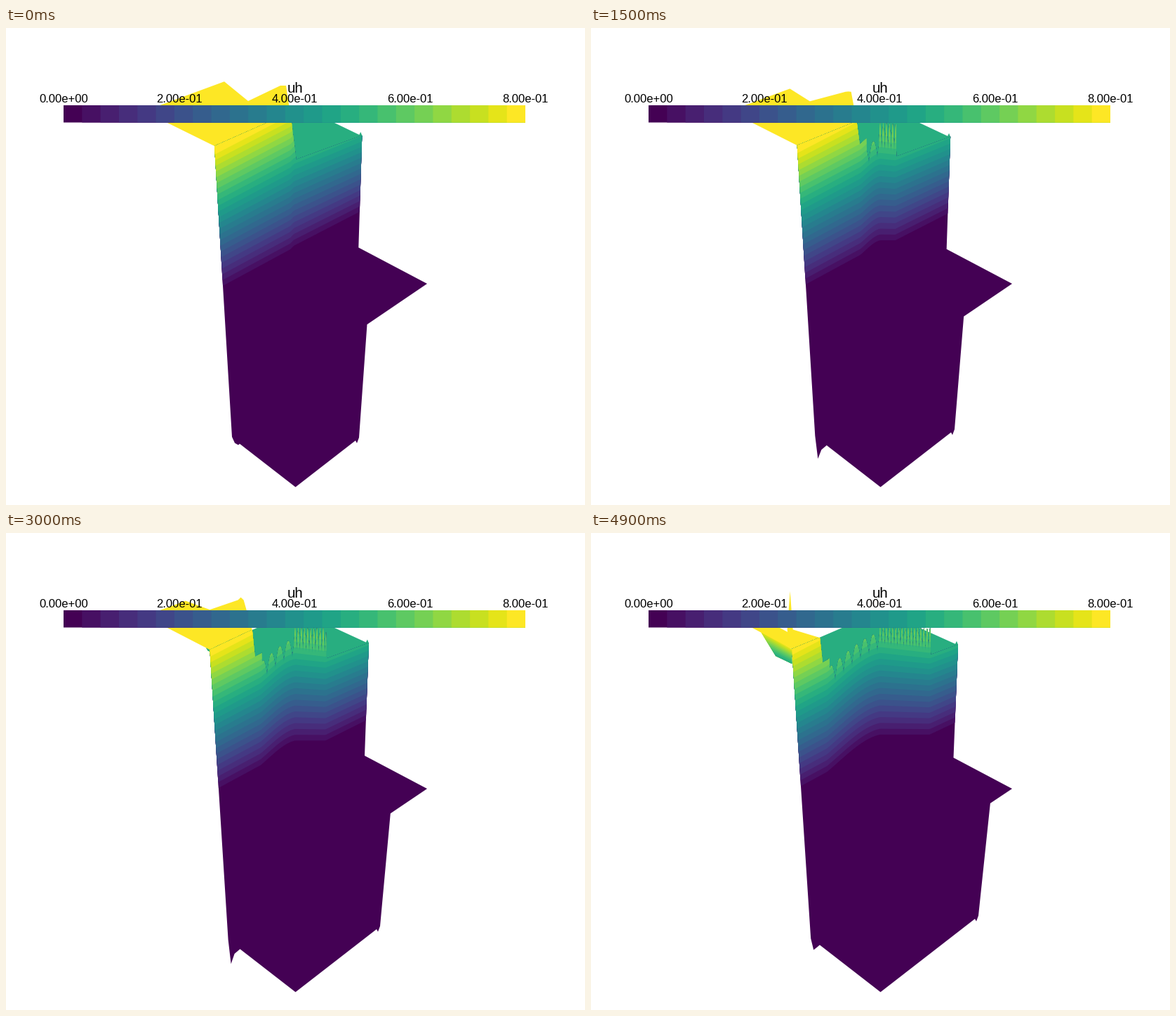
Write a matplotlib script that moves like this. It is 825 px wide and 679 px high and loops after 5000 ms.

```python
import numpy as np
import matplotlib.pyplot as plt
from matplotlib.animation import FuncAnimation
from matplotlib.patches import Polygon, Rectangle

W, H, DPI = 825, 679, 100
FRAMES, INTERVAL = 50, 100
BINS, PLATEAU = 25, 15
COLORS = plt.get_cmap("viridis").resampled(BINS)(np.arange(BINS))
BAR_X, BAR_Y, BAR_W, BAR_H = 82, 110, 658, 24.5
BOTTOM = np.array([412.5, 653.5])

# Everywhere below, u runs from 0 to 1 over the loop.


def base_contour(x, u):
    """Height of the lowest colour boundary: slope, bend, flat, slope."""
    x0, y0 = 309 - 10 * u, 367 - 7 * u
    bend = 405 - 70 * u
    crease, flat = 412, 309 - 22.5 * u
    kink = crease + 72 * u
    right = 503 + 14 * u
    y_bend = y0 - 0.54 * (bend - x0)
    span = crease - bend
    q = np.clip((x - bend) / span, 0, 1)
    rise = (y_bend * (2 * q**3 - 3 * q**2 + 1) + flat * (3 * q**2 - 2 * q**3)
            - 0.85 * span * (q**3 - 2 * q**2 + q) - 0.2 * span * (q**3 - q**2))
    slope = (262 + 9 * u - flat) / (right - kink)
    return np.where(x < bend, y0 - 0.54 * (x - x0),
                    np.where(x < crease, rise, flat + slope * np.maximum(x - kink, 0)))


def level(x, k, u):
    step = np.interp(x, [297, 412, 515], [8.4, 8.3, 7.5])
    return base_contour(x, u) - (k - 1) * step


def wall_top(u):
    return np.interp(u, [0, 0.7, 1], [407, 341.5, 325]), 135 + 15 * u**3


def crest(u):
    """Upper outline of the yellow part: two peaks with a dip between."""
    wall, wall_y = wall_top(u)
    peak_x = 311 - 92 * u
    dip_x, dip_y = 345 - 130 * u + 65 * u**2, 104 + 40 * u**4
    spike_x, spike_y = wall - 12 - 33 * u**4, 82 + 40 * u * (1 - u)
    side_y = dip_y + (spike_y - dip_y) * (1 - u**3)
    return [[205, 115.3], [peak_x, 109 - 0.368 * (peak_x - 222)], [dip_x, dip_y],
            [spike_x - 4, side_y], [spike_x, spike_y], [spike_x + 4, side_y],
            [wall, wall_y]]


def ripple_edge(wall, u):
    """Shelf by the wall, scallops up to the crease, thin spikes after it."""
    xl = np.arange(wall + 4, 410.1, 0.5)
    hump = np.abs(np.sin(np.pi * (408 - xl) / 12)) ** 0.8
    k = 15.2 + 3.3 * hump
    if u > 0.15:
        k = np.where(xl < wall + 14, 20, k)
    left = np.c_[xl, level(xl, k, u)]

    kink = 412 + 72 * u
    xr = np.arange(410.5, kink + 1, 0.5)
    phase = (xr - 412) / 4.45
    spike = 1 - 2 * np.abs(phase - np.round(phase))
    valley = level(xr, 16.3, u)
    right = np.c_[xr, valley + (132 - valley) * spike]
    end = [[kink + 1.5, level(kink + 1.5, 15.6, u)]]
    return np.vstack([left, right if u > 0 else right[:0], end])


def floor_point(x):
    return [x, BOTTOM[1] - 0.775 * abs(x - BOTTOM[0])]


def lower_edge(u):
    """From the right corner through the bottom tip to the left corner."""
    rx, ry = 503 + 50 * u, 583 - 39 * u
    lx, ly = 322 - 9 * u, 582 - 5 * u
    size = np.interp(u, [0, 0.1, 0.7, 0.82, 1], [0.25, 0.9, 1, 0.2, 0.5])
    bx, by = floor_point(lx + 9)
    return [[rx, ry], [rx - 3, ry + 8], floor_point(rx - 5), BOTTOM,
            floor_point(lx + 9 + 8 * size), [bx, by + 13 * size],
            [lx + 4, ly + 35 * size], [lx, ly]]


fig = plt.figure(figsize=(W / DPI, H / DPI), dpi=DPI, facecolor="white")
ax = fig.add_axes([0, 0, 1, 1])
ax.set(xlim=(0, W), ylim=(H, 0))
ax.axis("off")


def shape(color, z):
    return ax.add_patch(Polygon([[0, 0]] * 3, fc=color, ec="none", lw=0, zorder=z))


plateau = shape(COLORS[PLATEAU], 1)
flap_bands = [shape(COLORS[k], 2) for k in range(23, PLATEAU - 1, -1)]
top = shape(COLORS[-1], 3)
outline = shape("none", 4)
base = ax.add_patch(Rectangle((0, 0), W, H, fc=COLORS[0], ec="none", lw=0, zorder=4))
bands = [shape(COLORS[k], 5) for k in range(1, BINS)]

# Each bar segment reaches to the right end, so no seams show.
for n, color in enumerate(COLORS):
    offset = n * BAR_W / BINS
    ax.add_patch(Rectangle((BAR_X + offset, BAR_Y), BAR_W - offset, BAR_H,
                           fc=color, ec="none", lw=0, zorder=8, snap=False))
font = dict(family="Liberation Sans", color="black", ha="center", va="baseline", zorder=9)
for n in range(5):
    ax.text(BAR_X + n * BAR_W / 4, 105.5, f"{0.2 * n:.2e}", fontsize=12, **font)
ax.text(411.5, 92, "uh", fontsize=14.8, **font)


def update(i):
    u = i / FRAMES
    wall, wall_y = wall_top(u)
    left_top = np.array([297 - 11 * u, 168 - 3 * u])
    right_top = np.array([507.3 + 16 * u, 153 + 6 * u])

    plateau.set_xy(np.vstack([
        [[wall - 2, 134 + max(0, 362 - wall) * 0.43], [max(wall, 360), 134], [467, 134.5]],
        right_top + [-4, -1], right_top + [-2, -5], right_top,
        [[412, 215], [wall + 5, 215]]]))

    grow = np.clip((u - 0.55) / 0.43, 0, 1)
    tip, low_a, low_b = left_top + grow * np.array([[-46, -27], [-23, 10], [0, 21]])
    for j, band in enumerate(flap_bands):
        f = grow * j / len(flap_bands)
        band.set_xy([tip + f * (low_a - tip), left_top + f * (low_b - left_top), low_b, low_a])

    top.set_xy(np.vstack([crest(u), [[wall, wall_y + 20], left_top + [2, 4],
                                     left_top, [228, 134], [205, 122]]]))

    outline.set_xy(np.vstack([
        [left_top, [min(wall - 1, 372), max(134, wall_y)], [wall, wall_y]],
        ripple_edge(wall, u),
        [right_top, [502.3 + 14.5 * u, 312.5 + 7.5 * u], [600, 364],
         [514.5 + 55.5 * u, 422 - 38 * u]],
        lower_edge(u)]))

    base.set_clip_path(outline)
    for k, band in enumerate(bands, 1):
        x = np.linspace(275, 408 if k > 19 else 530, 128)
        band.set_xy(np.vstack([np.c_[x, level(x, k, u)], [[x[-1], 60], [x[0], 60]]]))
        band.set_clip_path(outline)
    return [plateau, *flap_bands, top, base, *bands]


anim = FuncAnimation(fig, update, frames=FRAMES, interval=INTERVAL,
                     repeat=True, repeat_delay=0, blit=False)
plt.show()
```
